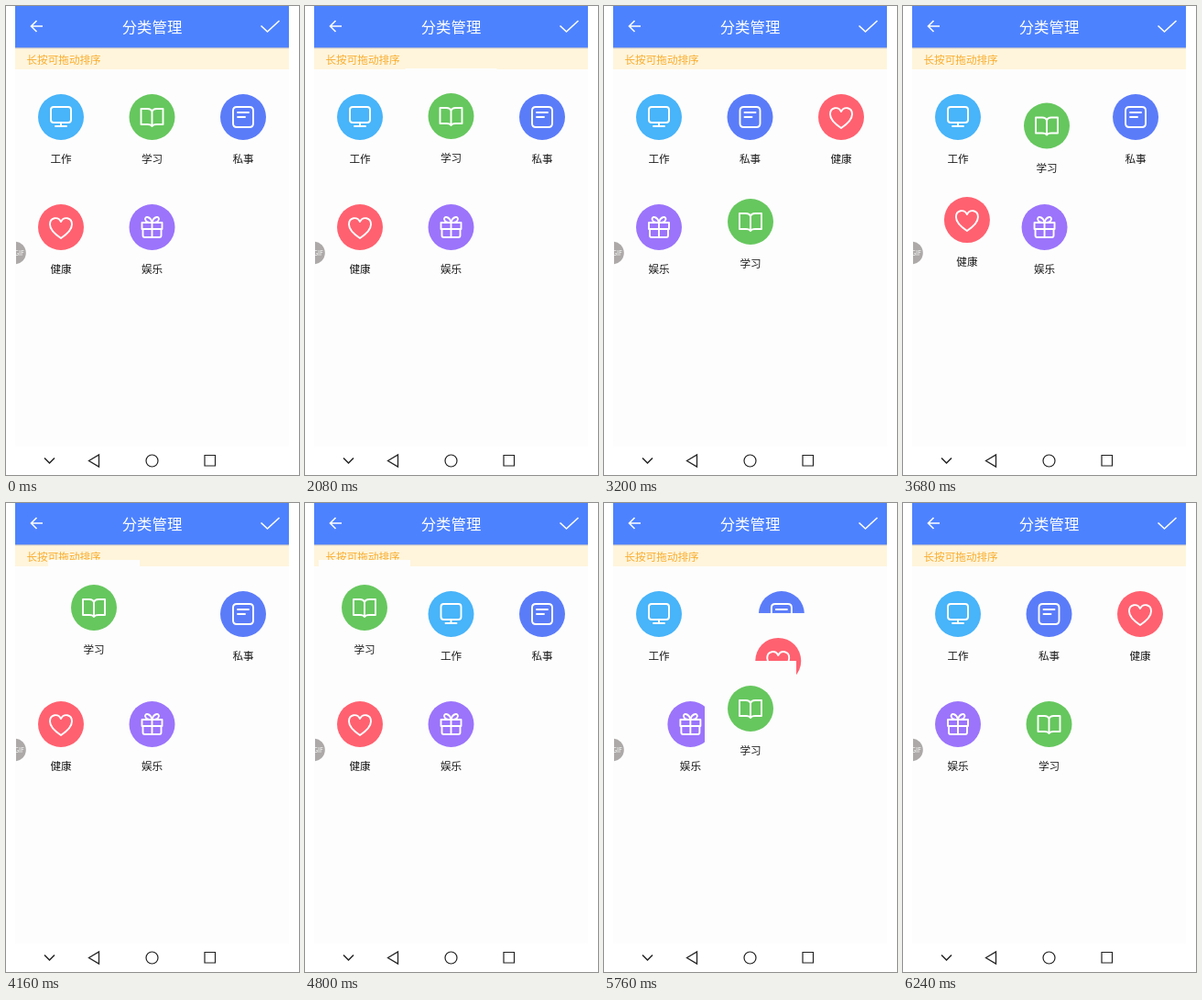
These frames come from a looping animation (320x511 px, 7840 ms). An HTML page with a canvas:

```html
<!DOCTYPE html>
<html lang="zh-CN">
<head>
<meta charset="utf-8">
<style>
html, body { margin: 0; width: 100%; height: 100%; overflow: hidden; background: #fff; }
canvas { display: block; width: 320px; height: 511px; }
</style>
</head>
<body>
<canvas id="stage"></canvas>
<script>
const W = 320, H = 511, LOOP = 7840, STEP = 160;
const FONT = '"Noto Sans CJK SC", "Noto Sans CJK", sans-serif';
const PAPER = '#fdfdfd';
const canvas = document.getElementById('stage');
const ctx = canvas.getContext('2d');
const dpr = window.devicePixelRatio || 1;
canvas.width = W * dpr;
canvas.height = H * dpr;

// Path of the dragged tile: time, x, y
const drag = [
  [2080, 159.5, 120], [2240, 160, 128], [2400, 161, 148], [2560, 162, 180],
  [2720, 162, 211], [2880, 161, 234], [3040, 160, 241], [3200, 160, 235],
  [3360, 159, 205], [3520, 158, 163], [3680, 157, 130.5], [3840, 150, 122],
  [4000, 127, 117], [4160, 96, 114], [4320, 72, 113], [4480, 65, 114],
  [4800, 65, 114], [4960, 78, 114], [5120, 105, 119], [5280, 139, 130],
  [5440, 156, 148], [5600, 158, 190], [5760, 160, 224], [5920, 160, 238]
];

const icons = {
  monitor: 'M-8-11H8Q11-11 11-8V3Q11 6 8 6H-8Q-11 6-11 3V-8Q-11-11-8-11ZM0 6V10M-6 10H6',
  book: 'M0-6Q-1-9-5-9H-12V8H-5Q-1 8 0 10Q1 8 5 8H12V-9H5Q1-9 0-6V10',
  note: 'M-7-11H7Q11-11 11-7V7Q11 11 7 11H-7Q-11 11-11 7V-7Q-11-11-7-11ZM-6-5H6M-6 0H2',
  heart: 'M0 12C-6 8-12 3-12-3C-12-11-3-12 0-6C3-12 12-11 12-3C12 3 6 8 0 12Z',
  gift: 'M-11-5H11V2H-11ZM-10 2V9Q-10 11-8 11H8Q10 11 10 9V2M0-5V11M0-5C-10-5-8-12-5-11Q-1-10 0-5C10-5 8-12 5-11Q1-10 0-5'
};
for (const k in icons) icons[k] = new Path2D(icons[k]);

function ease(t, start) {
  const u = Math.min(1, Math.max(0, (t - start) / 300));
  return (1 - Math.cos(Math.PI * u)) / 2;
}

function dragAt(t) {
  if (t < 2080) return [159.5, 121];
  if (t >= 6240) return [159.5, 241];
  let i = drag.length - 1;
  while (drag[i][0] > t) i--;
  const a = drag[i], b = drag[i + 1] || a;
  const u = b === a ? 0 : (t - a[0]) / (b[0] - a[0]);
  return [a[1] + (b[1] - a[1]) * u, a[2] + (b[2] - a[2]) * u];
}

function rect(x, y, w, h, color) {
  ctx.fillStyle = color;
  ctx.fillRect(x, y, w, h);
}

function disc(x, y, r, color) {
  ctx.fillStyle = color;
  ctx.beginPath();
  ctx.arc(x, y, r, 0, Math.PI * 2);
  ctx.fill();
}

function line(d, color, width) {
  ctx.strokeStyle = color;
  ctx.lineWidth = width;
  ctx.stroke(typeof d === 'string' ? new Path2D(d) : d);
}

function text(s, x, y, size, color, align = 'center') {
  ctx.font = size + 'px ' + FONT;
  ctx.textAlign = align;
  ctx.textBaseline = 'alphabetic';
  ctx.fillStyle = color;
  ctx.fillText(s, x, y + size * 0.38);
}

function tile(x, y, color, icon, label) {
  rect(x - 50, y - 52, 100, 120, PAPER);
  disc(x, y, 25, color);
  ctx.save();
  ctx.translate(x, y);
  ctx.lineJoin = ctx.lineCap = 'round';
  line(icons[icon], '#fff', 1.9);
  ctx.restore();
  text(label, x, y + 46, 11.6, '#1c1c1c');
}

function drawBars() {
  rect(0, 0, W, H, '#fff');
  rect(10, 46, 299, 434, PAPER);
  rect(10, 46, 299, 23, '#fff5dc');
  rect(10, 0, 299, 45, '#4d82ff');
  rect(10, 45, 299, 1, '#a9b4d4');
  rect(10, 46, 299, 1, '#ece5d6');
  text('分类管理', 159.5, 23, 16.4, '#fff');
  text('长按可拖动排序', 22.5, 58.5, 11.6, '#f9ac2c', 'left');
  line('M40 22H28M33.5 16L27.5 22L33.5 28', '#fff', 1.6);
  line('M278.5 21.5L285.5 28L298.5 16', '#fff', 1.6);
}

function drawNav() {
  const ink = '#222';
  line('M42 492.5L47.5 498L53 492.5', ink, 1.5);
  line('M90.5 495.5L101.5 489V502Z', ink, 1.3);
  line('M153 495.5a6.5 6.5 0 1 0 13 0a6.5 6.5 0 1 0-13 0Z', ink, 1.2);
  line('M217 489.5H228.5V501H217Z', ink, 1.2);
}

function drawBadge() {
  ctx.save();
  ctx.beginPath();
  ctx.rect(11, 250, 30, 40);
  ctx.clip();
  disc(9.5, 269, 12.3, '#aca9a8');
  text('GIF', 14.5, 269.5, 7, '#fff');
  ctx.restore();
}

function draw(t) {
  const shift = ease(t, 2553) - ease(t, 3423) + ease(t, 5580);
  const swap = ease(t, 4080) - ease(t, 5120);
  const back = t > 3423 && t < 4000;
  const lag = 0.35 * shift * (1 - shift) * (back ? -1 : 1);
  const passing = !back && shift > 0.3 && shift < 0.7 && t < 3000;

  ctx.setTransform(dpr, 0, 0, dpr, 0, 0);
  drawBars();
  tile(60 + 99.5 * swap, 121, '#48b4f9', 'monitor', '工作');
  tile(259 - 99.5 * shift, 121, '#5b7cf9', 'note', '私事');
  tile(60 + 199 * shift, 241 - 120 * (shift - lag), passing ? '#d3b078' : '#ff6170', 'heart', '健康');
  tile(159.5 - 99.5 * shift, 241, '#9b74fb', 'gift', '娱乐');
  tile(...dragAt(t), '#66c75e', 'book', '学习');
  drawBadge();
  drawNav();
}

const start = performance.now();
function tick() {
  const t = (performance.now() - start) % LOOP;
  draw(Math.floor(t / STEP) * STEP);
  requestAnimationFrame(tick);
}
tick();
</script>
</body>
</html>
```
